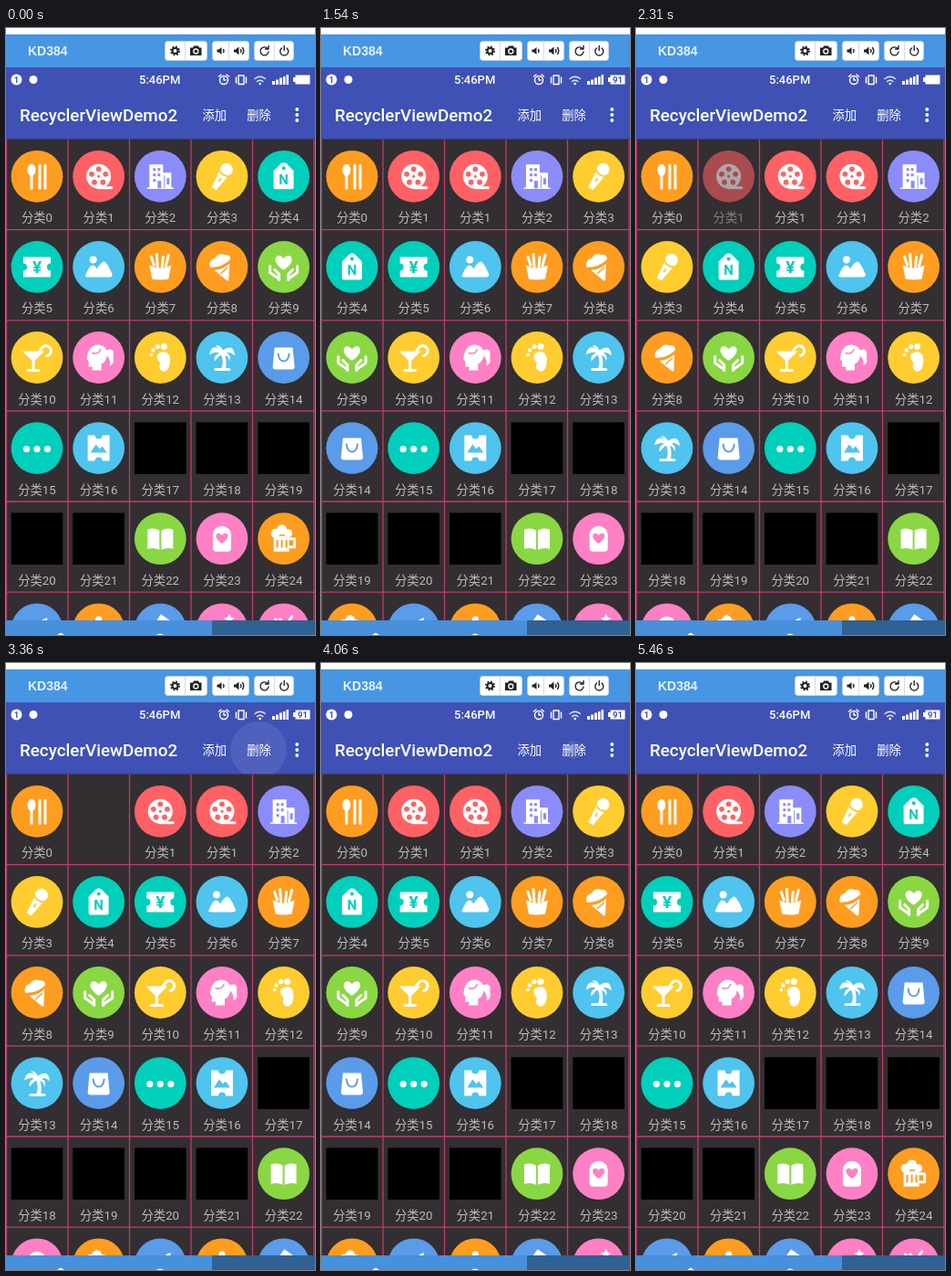
Recreate the animation shown at these times as an HTML page. Size 339 px wide and 664 px high, loop 5530 ms.

```html
<!DOCTYPE html>
<html lang="zh-CN">
<head>
<meta charset="utf-8">
<title>RecyclerViewDemo2</title>
<style>
html, body { margin: 0; width: 100%; height: 100%; overflow: hidden; background: #fff; }
svg { display: block; width: 339px; height: 664px; font-family: Roboto, "Noto Sans CJK SC", "Noto Sans CJK", sans-serif; }
.s, .k { fill: none; stroke: #fff; stroke-width: 3; stroke-linecap: round; stroke-linejoin: round; }
.k { stroke: currentColor; stroke-width: 2; }
.c { fill: currentColor; }
.t { stroke-width: 1.4; }
.label { font-size: 13.3px; fill: #bdbbbd; text-anchor: middle; }
</style>
</head>
<body>
<svg viewBox="0 0 339 664" fill="#fff">
  <!-- mirror window title -->
  <rect y="7" width="339" height="37" fill="#4796e4"/>
  <text x="24" y="30" font-family="Liberation Sans, sans-serif" font-weight="700" font-size="14" fill="#e4f0fc">KD384</text>
  <g stroke="#c9d3dd" stroke-width=".8">
    <rect x="174.500" y="14.500" width="46" height="21" rx="3"/>
    <rect x="226.500" y="14.500" width="40" height="21" rx="3"/>
    <rect x="272.500" y="14.500" width="43" height="21" rx="3"/>
    <path d="M196.500 15V35M244.500 15V35M294.500 15V35"/>
  </g>
  <g fill="#222" color="#222">
    <circle cx="185.500" cy="25" r="3" class="k"/>
    <circle cx="185.500" cy="25" r="4.500" class="k" stroke-dasharray="1.700 1.834" style="stroke-linecap:butt"/>
    <path d="M202 21.500h3l1-2h5l1 2h2.500v8.500h-12.500z"/>
    <circle cx="208.300" cy="25.500" r="2.500" fill="none" stroke="#fff" stroke-width="1.300"/>
    <path d="M231.500 23.500h2l3-2.500v8l-3-2.500h-2zM250 23.500h2l3.500-3v9l-3.500-3h-2z"/>
    <path class="k t" d="M238.500 23.500q1 1.500 0 3M257.500 23.500q1 1.500 0 3M259.500 21.500q2.500 3.500 0 7"/>
    <path class="k t" d="M287 22.500A4.500 4.500 0 1 0 288 26M288 19.500V23H284.500M302.500 22A4.500 4.500 0 1 0 308 22M305.200 19.500V24.500"/>
  </g>

  <!-- status bar and toolbar -->
  <rect y="43" width="339" height="79" fill="#3f51b5"/>
  <g id="ripples"></g>
  <circle cx="11.500" cy="56.500" r="6"/>
  <text x="11.500" y="60" font-size="9.500" font-weight="700" text-anchor="middle" fill="#3f51b5">1</text>
  <circle cx="30" cy="56.500" r="4.500"/>
  <text x="146" y="61" font-size="13" font-weight="500">5:46PM</text>
  <g class="s t">
    <circle cx="239" cy="57" r="4.500"/>
    <path d="M239 54.500V57H241M233.500 53L236 51M244.500 53L242 51M255 52h6v9.500h-6zM252.500 54v6M263.500 54v6"/>
    <path d="M275.500 58.500q3.200-2.600 6.400 0M273 55.500q5.700-4.600 11.400 0" opacity=".85"/>
  </g>
  <circle cx="278.700" cy="61" r="1.300"/>
  <path d="M292 58h3v4h-3zM296 56.500h3v5.500h-3zM300 54.500h3v7.500h-3zM304 53h2.500v9h-2.500zM307.500 51h2.500v11h-2.500z"/>
  <path d="M315 54h2.500v-2.500h16v10h-16v-2.500h-2.500z"/>
  <text id="level" x="325.500" y="60" font-size="9.500" font-weight="700" text-anchor="middle" fill="#3f51b5">91</text>
  <text x="15" y="102" font-size="18.800" font-weight="500">RecyclerViewDemo2</text>
  <g font-size="13.300"><text x="215.500" y="100">添加</text><text x="264.300" y="100">删除</text></g>
  <circle cx="319.300" cy="89" r="1.900"/><circle cx="319.300" cy="95" r="1.900"/><circle cx="319.300" cy="101" r="1.900"/>

  <!-- list -->
  <rect y="121.500" width="339" height="527" fill="#322e32"/>
  <path id="lines" fill="none" stroke="#c43a6c" stroke-width="1.300"/>
  <g id="list"></g>

  <!-- bottom bar -->
  <rect y="648" width="226" height="16" fill="#4790dc"/>
  <rect x="226" y="648" width="113" height="16" fill="#2f6292"/>
  <path d="M56 664l4-2.500 4 2.500zM165 664q4-3 8 0z"/>
</svg>
<script>
const $ = id => document.getElementById(id);
const LOOP = 5530, STEP = 70;
const orange = '#ff9d20', red = '#ff6164', purple = '#8b8cfa', yellow = '#ffcd30', teal = '#00cfbc',
  sky = '#4ec4ee', green = '#8ad744', pink = '#ff80c4', blue = '#5a9bea';

const shape = (d, cls = '') => `<path class="${cls}" d="${d}"/>`;
const dot = (x, y, r, cls = '') => `<circle cx="${x}" cy="${y}" r="${r}" class="${cls}"/>`;
const oval = (x, y, rx, ry) => `<ellipse cx="${x}" cy="${y}" rx="${rx}" ry="${ry}"/>`;
const turn = (deg, body) => `<g transform="rotate(${deg})">${body}</g>`;
const glyph = (s, y, size) => `<text class="c" y="${y}" font-size="${size}" font-weight="700" text-anchor="middle">${s}</text>`;
const heart = (y, k, cls) => `<g transform="translate(0 ${y}) scale(${k})">${shape('M0 7C-16-3-6-13 0-5C6-13 16-3 0 7Z', cls)}</g>`;
const holes = [0, 1, 2, 3, 4].map(i => {
  const a = (i * 72 - 90) * Math.PI / 180;
  return dot(8 * Math.cos(a), 8 * Math.sin(a), 2.9, 'c');
}).join('');

const icons = [
  [orange, oval(-6, -7, 4.5, 6.5) + shape('M-6-4V13M3-12V13M9-12V13', 's')],
  [red, dot(0, 0, 13.5) + shape('M0 12.500H14', 's') + holes + dot(0, 0, 1.5, 'c')],
  [purple, shape('M-12 13V-13H3V-4H12V13Z') + shape('M-14 13H14', 's t') +
    shape('M-8-9h3v3h-3zM-3-9h3v3h-3zM-8-3h3v3h-3zM-3-3h3v3h-3zM-8 3h3v3h-3zM4-1h1v14h-1zM-3 5h4v8h-4zM7 2h3v7h-3z', 'c')],
  [yellow, turn(33, dot(0, -9, 7) + shape('M-5.500-3H5.500L3 16H-3Z') + shape('M-7-4.500Q0 0 7-4.500M0 3V6', 'k'))],
  [teal, shape('M-11-6L-3-14Q0-16 3-14L11-6V12Q11 14 9 14H-9Q-11 14-11 12Z') + dot(0, -9, 2, 'c') + glyph('N', 9, 15)],
  [teal, shape('M-15-11H15V-4A4 4 0 0 0 15 4V11H-15V4A4 4 0 0 0-15-4Z') + glyph('¥', 7, 19)],
  [sky, dot(-6, -8, 4) + shape('M-15 10Q-10-2-7-2Q-4-2-2 2Q3-6 6-6Q9-6 15 8Q15 11 12 11H-13Z')],
  [orange, shape('M-12-2Q0 4 12-2L9 13Q0 15-9 13Z') + shape('M-7-2L-10-11M-3 0L-4-14M2 0L3-11M6-1L9-13', 's')],
  [orange, turn(-24, shape('M-12-5Q-11-13-3-12Q3-16 8-11Q14-9 12-4Q0 1-12-5Z') + shape('M-9 0Q0 3 9 0L1 16Q0 17-1 16Z') + shape('M-4 6L5 3', 'k t'))],
  [green, heart(-4, 1.05, '') + shape('M-15-1V6L-5 13M15-1V6L5 13', 's') + shape('M-10 3L-5 8V14M10 3L5 8V14', 's')],
  [yellow, shape('M-16-7H8L-4 5Z') + shape('M-4 3V14M-10 14H2', 's') + shape('M0-3L5-10A5.500 5.500 0 1 1 11-2', 's')],
  [pink, shape('M-13 2Q-12-14 0-14Q10-13 9-2Q8 5 3 7V14H-7V10H-11L-11 4Z') + shape('M8-8Q18-12 16-1Q18 7 12 9Q14 3 9-2Z') + shape('M-7-5Q0-3 2-9', 'k t')],
  [yellow, shape('M-3-4Q6-10 10-2Q12 4 9 12Q5 18 0 13Q-2 10 0 6Q-5 1-3-4Z') + dot(4, -12, 3.5) + dot(-3, -12, 2.6) + dot(-8, -8, 2.2) + dot(-10, -3, 1.8)],
  [sky, shape('M-2-5Q3 4-1 13L4 13Q6 2 2-6Z') + shape('M0-7Q-11-17-14-3Q-8-7-3-5Q-10-2-8 4Q-4-1 0-4Q8-2 8 4Q11-2 5-5Q9-7 14-2Q13-16 1-8Q-2-14-7-13Z') + shape('M-7 13H8', 's')],
  [blue, shape('M-10-11H10L12 10Q12 13 9 13H-9Q-12 13-12 10Z') + shape('M-6-4Q-5 4 0 4Q5 4 6-4', 'k')],
  [teal, dot(-11.5, 1, 3.6) + dot(0, 1, 3.6) + dot(11.5, 1, 3.6)],
  [sky, shape('M-12-14H-4A4 4 0 0 0 4-14H12V14H4A4 4 0 0 0-4 14H-12Z') + shape('M-9 5L-3-4L1 1L4-2L9 5Z', 'c')],
  null, null, null, null, null,
  [green, shape('M-1-9Q-7-13-14-10V11Q-7 9-1 12ZM1-9Q7-13 14-10V11Q7 9 1 12Z')],
  [pink, shape('M-6-12Q0-16 6-12Q11-9 10 0V10Q10 14 6 14H-6Q-10 14-10 10V0Q-11-9-6-12Z') + heart(0, .75, 'c')],
  [orange, shape('M-11-3H6V14H-11Z') + dot(-9, -6, 5) + dot(-2, -10, 5.5) + dot(5, -6, 4.5) + shape('M7 0H12V9H7', 's') + shape('M-7 2V9M-2 2V9M3 2V9', 'k')],
  [blue, turn(42, shape('M0-17Q3-14 3-7L15 3V6L3 3V11L7 15H-7L-3 11V3L-15 6V3L-3-7Q-3-14 0-17Z'))],
  [orange, dot(0, -11, 3.5) + shape('M-10 13Q-12-6 0-9Q12-6 10 13Z')],
  [blue, turn(35, shape('M-9-14H7V13H-9Z') + shape('M-7-6H5', 'k'))],
  [pink, turn(42, shape('M-3-8H3V18H-3Z')) + shape('M8-17L10-13L14-12L10-10L8-6L6-10L2-12L6-13Z')],
  [pink, shape('M-9-11L9 12M9-14L-9 12', 's') + shape('M-4-11L0-7', 's')]
];

const NS = 'http://www.w3.org/2000/svg';
function add(parent, tag, attrs, html = '') {
  const el = parent.appendChild(document.createElementNS(NS, tag));
  for (const k in attrs) el.setAttribute(k, attrs[k]);
  el.innerHTML = html;
  return el;
}
function makeItem(n) {
  const icon = icons[n];
  const art = icon ? dot(0, 0, 28.4, 'c') + icon[1] : '<rect x="-28.3" y="-28.3" width="56.6" height="56.6" fill="#000"/>';
  return add($('list'), 'g', { color: icon ? icon[0] : '#000' }, `${art}<text class="label" y="50">分类${n}</text>`);
}

let grid = '';
for (let i = 0; i < 6; i++) grid += `M${0.5 + 67.5 * i} 122V648`;
for (let i = 0; i < 5; i++) grid += `M0 ${220.7 + 99.1 * i}H339`;
$('lines').setAttribute('d', grid);

const first = makeItem(0), copyB = makeItem(1), copyA = makeItem(1);
const rest = icons.slice(1).map((_, i) => makeItem(i + 1));

// centre x, press time, release time
const taps = [[229, 750, 1040], [229, 1750, 1980], [277, 3020, 3230], [277, 4060, 4200]];
const ripples = taps.map(([x]) => add($('ripples'), 'circle', { cx: x, cy: 95 }));

const ramp = (t, a, b) => Math.min(1, Math.max(0, (t - a) / (b - a)));
const ease = (t, a, b) => (1 - Math.cos(Math.PI * ramp(t, a, b))) / 2;
const mix = (a, b, f) => a + (b - a) * f;
const cellX = i => 34 + 67.65 * (i % 5);
const cellY = i => 162.3 + 99.1 * Math.floor(i / 5);

// A fractional index lies on the straight way between two neighbouring cells.
function place(el, index, alpha = 1) {
  const i = Math.floor(index), f = index - i;
  el.setAttribute('transform', `translate(${mix(cellX(i), cellX(i + 1), f)} ${mix(cellY(i), cellY(i + 1), f)})`);
  el.setAttribute('opacity', alpha);
}

function draw(t) {
  const shift = ease(t, 1040, 1300) + ease(t, 1980, 2240) - ease(t, 3370, 3620) - ease(t, 4330, 4580);
  place(first, 0);
  place(copyB, 1, ramp(t, 2240, 2360) - ramp(t, 3230, 3350));
  place(copyA, 1 + Math.max(0, shift - 1), ramp(t, 1300, 1420) - ramp(t, 4200, 4320));
  rest.forEach((el, i) => place(el, i + 1 + shift));

  taps.forEach(([, down, up], i) => {
    ripples[i].setAttribute('r', mix(10, 31, ramp(t, down, down + 225)));
    ripples[i].setAttribute('opacity', .16 * ramp(t, down - STEP, down + STEP) * (1 - ramp(t, up, up + 300)));
  });

  // the charging battery fills up and shows its level again
  const phase = (t + 430) % 2380;
  $('level').setAttribute('opacity', 1 - ramp(phase, 0, 200) + ramp(phase, 700, 1150));
}

function frame() {
  draw(Math.floor(performance.now() % LOOP / STEP) * STEP);
  requestAnimationFrame(frame);
}
frame();
</script>
</body>
</html>
```
